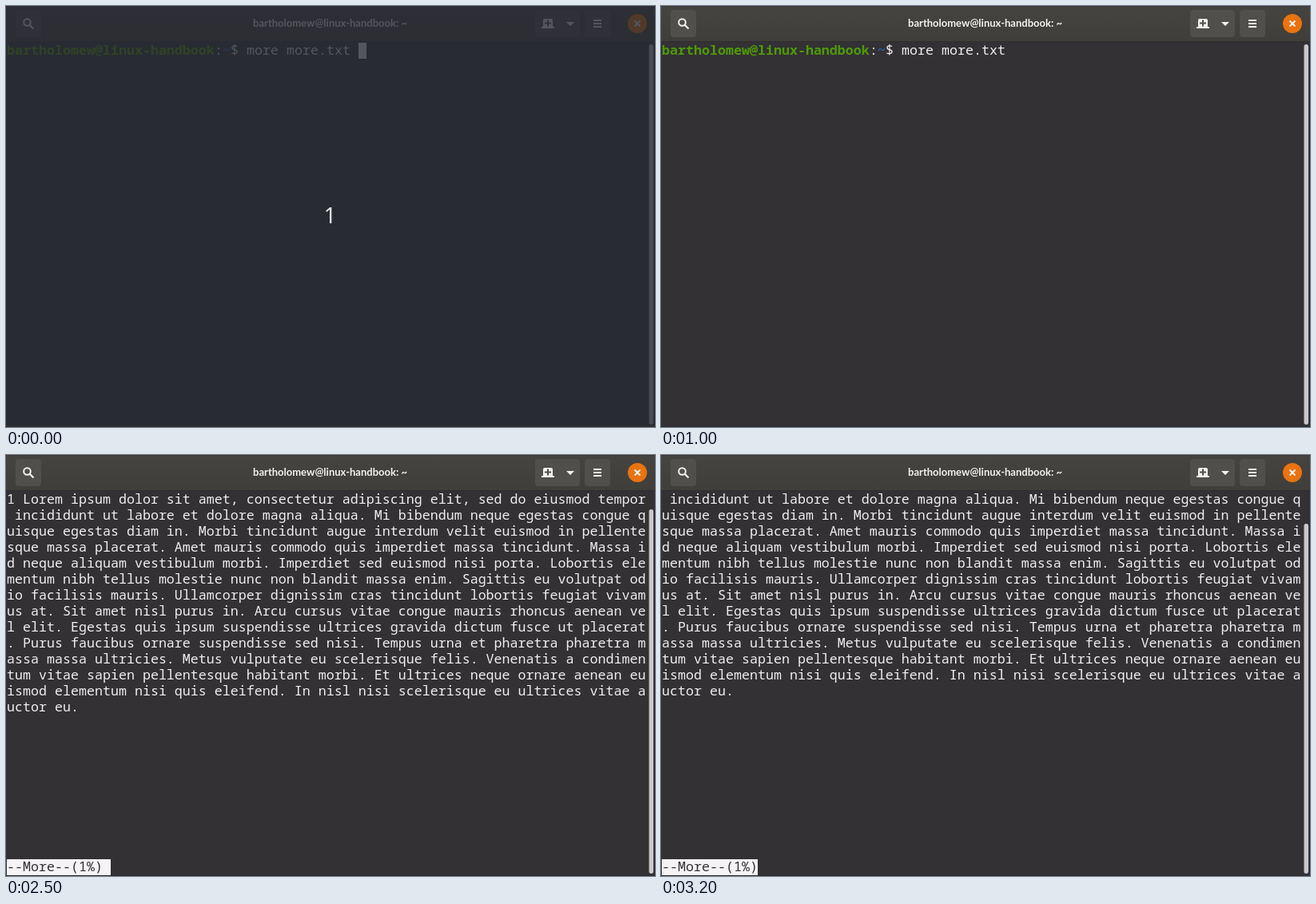
These frames come from a looping animation (812x527 px, 3300 ms). An HTML page with a canvas:

```html
<!DOCTYPE html>
<html lang="en">
<head>
<meta charset="utf-8">
<style>
  html, body { margin: 0; width: 100%; height: 100%; overflow: hidden; background: #333134; }
  canvas { display: block; }
</style>
</head>
<body>
<canvas id="stage" width="812" height="527"></canvas>
<script>
const ctx = document.getElementById('stage').getContext('2d');
const LOOP = 3300, CELL = 10, ROW = 20, LEFT = 1, TOP = 46;
const BG = '#333134', FG = '#f0edf0', LIGHT = '#f6f3f6', ICON = '#f2f1ef', BUTTON = '#504f4c';
const USER = 'bartholomew@linux-handbook';
const PAGE = [
  '1 Lorem ipsum dolor sit amet, consectetur adipiscing elit, sed do eiusmod tempor',
  ' incididunt ut labore et dolore magna aliqua. Mi bibendum neque egestas congue q',
  'uisque egestas diam in. Morbi tincidunt augue interdum velit euismod in pellente',
  'sque massa placerat. Amet mauris commodo quis imperdiet massa tincidunt. Massa i',
  'd neque aliquam vestibulum morbi. Imperdiet sed euismod nisi porta. Lobortis ele',
  'mentum nibh tellus molestie nunc non blandit massa enim. Sagittis eu volutpat od',
  'io facilisis mauris. Ullamcorper dignissim cras tincidunt lobortis feugiat vivam',
  'us at. Sit amet nisl purus in. Arcu cursus vitae congue mauris rhoncus aenean ve',
  'l elit. Egestas quis ipsum suspendisse ultrices gravida dictum fusce ut placerat',
  '. Purus faucibus ornare suspendisse sed nisi. Tempus urna et pharetra pharetra m',
  'assa massa ultricies. Metus vulputate eu scelerisque felis. Venenatis a condimen',
  'tum vitae sapien pellentesque habitant morbi. Et ultrices neque ornare aenean eu',
  'ismod elementum nisi quis eleifend. In nisl nisi scelerisque eu ultrices vitae a',
  'uctor eu.'
];

function rect(x, y, w, h, color, radius = 0) {
  ctx.fillStyle = color;
  ctx.beginPath();
  ctx.roundRect(x, y, w, h, radius);
  ctx.fill();
}

function line(color, width, ...points) {
  ctx.strokeStyle = color;
  ctx.lineWidth = width;
  ctx.beginPath();
  for (let i = 0; i < points.length; i += 4) {
    ctx.moveTo(points[i], points[i + 1]);
    ctx.lineTo(points[i + 2], points[i + 3]);
  }
  ctx.stroke();
}

function centered(text, y, font, color) {
  ctx.font = font;
  ctx.fillStyle = color;
  ctx.textAlign = 'center';
  ctx.fillText(text, 405.5, y);
  ctx.textAlign = 'left';
}

function print(text, col, row, color = FG, weight = 400) {
  ctx.font = `${weight} 16.667px "Noto Sans Mono", monospace`;
  ctx.fillStyle = color;
  ctx.fillText(text, LEFT + col * CELL, TOP + row * ROW + 15);
}

function block(col, row, cells) {
  rect(LEFT + col * CELL, TOP + row * ROW, cells * CELL, ROW, LIGHT);
}

function header() {
  const shade = ctx.createLinearGradient(0, 0, 0, 45);
  shade.addColorStop(0, '#454440');
  shade.addColorStop(1, '#3f3e3a');
  rect(0, 0, 812, 45, shade);
  rect(0, 0, 812, 1, '#383734');
  rect(0, 44, 812, 1, '#302f2e');
  centered(USER + ': ~', 26, 'bold 13px Lato, sans-serif', ICON);

  for (const [x, w] of [[12, 32], [662, 56], [724, 32]]) rect(x, 5, w, 34, BUTTON, 4);

  // search
  line(ICON, 2.2, 29.5, 23.5, 34.5, 28.5);
  ctx.lineWidth = 2;
  ctx.beginPath();
  ctx.arc(26.5, 20.5, 4.3, 0, 7);
  ctx.stroke();

  // new tab and its menu arrow
  rect(672, 16, 12, 11, ICON, [2, 2, 0, 0]);
  rect(670, 26, 16, 2, ICON);
  line(BUTTON, 2, 674, 21.5, 682, 21.5, 678, 17.5, 678, 25.5);
  ctx.fillStyle = ICON;
  ctx.beginPath();
  ctx.moveTo(701, 20);
  ctx.lineTo(711, 20);
  ctx.lineTo(706, 25);
  ctx.fill();

  // main menu
  for (const y of [17, 21, 25]) rect(735, y, 10, 2, ICON);

  // close
  rect(778, 10, 24, 24, '#e9730e', 12);
  line(ICON, 2, 786.5, 18.5, 793.5, 25.5, 793.5, 18.5, 786.5, 25.5);
}

function scrollbar(top) {
  rect(804.5, top, 5.5, 524 - top, '#cac8ca', 2.7);
}

function prompt(cursorOn) {
  print(USER, 0, 0, '#4e9a06', 700);
  print(':', 26, 0);
  print('~', 27, 0, '#3465a4', 700);
  print('$ more more.txt', 28, 0);
  if (cursorOn) block(44, 0, 1);
  scrollbar(48);
}

function pager(skipped, cursorOn) {
  PAGE.slice(skipped).forEach((text, row) => print(text, 0, row));
  block(0, 23, cursorOn ? 13 : 12);
  print('--More--(1%)', 0, 23, BG);
  scrollbar(skipped ? 86 : 68);
}

function draw(t) {
  rect(0, 0, 812, 527, BG);
  header();
  if (t < 2500) prompt(t < 1000 || (t >= 1300 && t < 2200));
  else pager(t < 2800 ? 0 : 1, t < 3200);
  rect(0, 526, 812, 1, '#2b292b');
  if (t < 500) {
    rect(0, 0, 812, 525, 'rgba(39, 42, 50, 0.78)');
    centered('1', 272, '27px "Noto Sans", sans-serif', '#e4e4e5');
  }
}

function tick() {
  draw(performance.now() % LOOP);
  requestAnimationFrame(tick);
}
tick();
</script>
</body>
</html>
```
